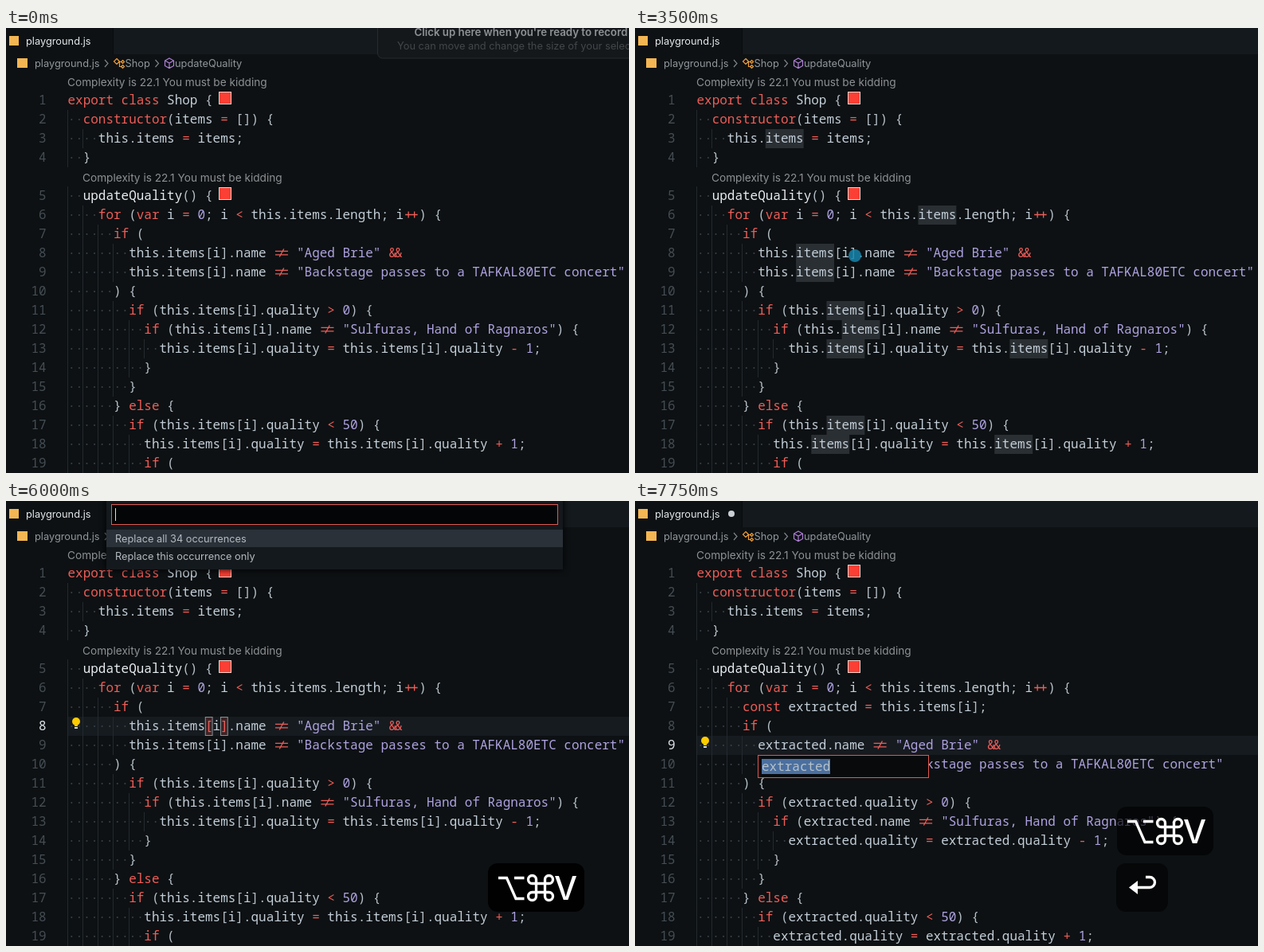
Recreate the animation shown at these times as an HTML page. Size 782x559 px, loop 8 s.

```html
<!DOCTYPE html>
<html lang="en">
<head>
<meta charset="utf-8">
<title>Extract variable</title>
<style>
  html, body { margin: 0; width: 100%; height: 100%; overflow: hidden; background: #0d1113; }
  svg { display: block; width: 782px; height: 559px; }
  text { font: 12.8px Inter, "Open Sans", sans-serif; fill: #a3a9ae; }
  .code text { font: 15.97px "Noto Sans Mono", "DejaVu Sans Mono", monospace; white-space: pre; }
  .code .key { fill: #ee5d58; }
  .code .str { fill: #aea2e0; }
  .code .id { fill: #c3ced8; }
  .code .fn { fill: #e8edf2; }
  .code .punct { fill: #b6c0c8; }
  .code .num { fill: #444d54; text-anchor: end; }
  .code .on { fill: #d3d9de; }
  .crumb { fill: #90979c; }
  .option { fill: #b4bbc1; }
  .lens { font-size: 13.65px; fill: #8d9194; }
  .lig { fill: none; stroke: #ee5d58; stroke-width: 1.3; }
  .glyph { fill: none; stroke: #fff; stroke-width: 3.3; }
</style>
</head>
<body>
<svg id="stage" viewBox="0 0 782 559">
  <rect width="782" height="559" fill="#0d1113"/>
  <rect x="134" width="648" height="33" fill="#14191d"/>
  <path d="M134.5 0V33" stroke="#090c0e"/>
  <rect x="4" y="10" width="12" height="12" fill="#f4b653"/>
  <text x="25" y="20.7" style="fill:#e4e8eb">playground.js</text>
  <circle id="dirty" cx="121" cy="16" r="4" fill="#c9cfd4"/>

  <rect x="14" y="38" width="13" height="12" fill="#f4b653"/>
  <text class="crumb" x="36" y="48.8">playground.js</text>
  <path d="M124 40l4 4.5l-4 4.5M187.5 40l4 4.5l-4 4.5" fill="none" stroke="#7d8489" stroke-width="1.2"/>
  <g fill="none" stroke="#ee9d3b" stroke-width="1.2">
    <path d="M139 38.5l3.5 3.5l-3.5 3.5l-3.5 -3.5zM141.5 42.5h4M142.5 42.5v6h3"/>
    <path d="M146.5 40.5l2 2l-2 2l-2 -2zM146.5 46.5l2 2l-2 2l-2 -2z"/>
  </g>
  <text class="crumb" x="149.5" y="48.8">Shop</text>
  <path d="M205 38l5.5 3v6.5l-5.5 3l-5.5 -3v-6.5zM199.5 41l5.5 3l5.5 -3M205 44v6.5" fill="none" stroke="#b180d7" stroke-width="1.2"/>
  <text class="crumb" x="212" y="48.8">updateQuality</text>

  <g id="under" class="code"></g>
  <text class="lens" x="77" y="73">Complexity is 22.1 You must be kidding</text>
  <text class="lens" x="96" y="193">Complexity is 22.1 You must be kidding</text>
  <g id="before" class="code"></g>
  <g id="after" class="code"></g>
  <g fill="#fb3f34" stroke="#f1d3cd">
    <rect x="267.5" y="80.5" width="15" height="15"/>
    <rect x="267.5" y="200.5" width="15" height="15"/>
  </g>
  <g id="over" class="code"></g>

  <g id="bulb">
    <circle cx="88" cy="277" r="5" fill="#ffcc00"/>
    <path d="M86 279h4v4h-4z" fill="#ffcc00"/>
    <path d="M86 284h4v2h-4z" fill="#d5d8da"/>
  </g>
  <rect id="caret" x="278" y="271" width="2" height="24" fill="#f2f4f5"/>
  <circle id="mouse" fill="#1685ad"/>

  <g id="rename" class="code">
    <rect x="154.5" y="319.5" width="214" height="28" fill="#080a0c" stroke="#e0574f"/>
    <rect x="159" y="324" width="86" height="19" fill="#4b709f"/>
    <text x="159" y="339" style="fill:#b5c1cc">extracted</text>
  </g>

  <g id="picker">
    <rect x="126" y="-10" width="573" height="96" fill="#14191d" style="filter:drop-shadow(0 0 4px #000)"/>
    <rect x="132.5" y="4.5" width="560" height="25" fill="#040506" stroke="#e0574f"/>
    <rect x="126" y="36" width="573" height="22" fill="#2a3138"/>
    <text class="option" x="137" y="51.8">Replace all 34 occurrences</text>
    <text class="option" x="137" y="73.8">Replace this occurrence only</text>
    <path id="inputCaret" d="M137.5 9V25" stroke="#d8dde1"/>
  </g>

  <g id="keys">
    <rect id="keysBack" x="605" y="455" width="121" height="61" rx="12"/>
    <path class="glyph" d="M618 473.5H628.5L640 499.5H650.5M638 473.5H650.5"/>
    <g id="command" class="glyph" transform="translate(671 486)"></g>
    <text x="688" y="501" style="font-size:41px;font-weight:500;fill:#fff">V</text>
  </g>
  <g id="enter">
    <rect x="604" y="455" width="65" height="61" rx="12" fill-opacity=".6"/>
    <path class="glyph" d="M627 485.5H646a6.5 6.5 0 0 0 0 -13H641"/>
    <path d="M631 477v17l-11 -8.5z" fill="#fff"/>
  </g>

  <g id="hint">
    <path d="M466.5 -1V32a6 6 0 0 0 6 6H783V-1z" fill="#14181b" stroke="#262b2e"/>
    <text x="512.5" y="9.8" style="font-size:13.25px;font-weight:600;fill:#8f9295">Click up here when you're ready to record</text>
    <text x="491" y="26.8" style="fill:#43474a">You can move and change the size of your selection</text>
  </g>
</svg>
<script>
const LOOP = 8000, X0 = 77.5, CW = 9.583;
const $ = id => document.getElementById(id);
const colX = col => X0 + col * CW;
const rowTop = n => 55 + n * 24 + (n > 4 ? 24 : 0);
const baseY = n => rowTop(n) + 17;

const source = `export class Shop {
  constructor(items = []) {
    this.items = items;
  }
  updateQuality() {
    for (var i = 0; i < this.items.length; i++) {
      if (
        this.items[i].name != "Aged Brie" &&
        this.items[i].name != "Backstage passes to a TAFKAL80ETC concert"
      ) {
        if (this.items[i].quality > 0) {
          if (this.items[i].name != "Sulfuras, Hand of Ragnaros") {
            this.items[i].quality = this.items[i].quality - 1;
          }
        }
      } else {
        if (this.items[i].quality < 50) {
          this.items[i].quality = this.items[i].quality + 1;
          if (`.split("\n");

const extracted = source.map(line => line.replaceAll("this.items[i]", "extracted"));
extracted.splice(6, 0, "      const extracted = this.items[i];");
extracted.length = source.length;

const escapeXml = s => s.replace(/&/g, "&amp;").replace(/</g, "&lt;");
const label = (x, y, cls, s) => `<text x="${x}" y="${y}" class="${cls}">${escapeXml(s)}</text>`;
const box = (x, y, w, h, attrs) => `<rect x="${x}" y="${y}" width="${w}" height="${h}" ${attrs}/>`;

const TOKEN = /"[^"]*"|!=|&&|\+\+|[A-Za-z_]\w*|\d+|[=<>+\-]|[^\s"\w=<>+\-]+/g;
const KEYWORD = /^(export|class|constructor|for|var|const|if|else|[=<>+\-])$/;

function tokenClass(s) {
  if (KEYWORD.test(s)) return "key";
  if (/^["\d]/.test(s)) return "str";
  if (s === "updateQuality") return "fn";
  return /^\w/.test(s) ? "id" : "punct";
}

// Operators drawn as joined ligatures
function drawToken(s, x, y) {
  if (s === "!=")
    return `<path class="lig" d="M${x + 1.7} ${y - 7.7}h16m-16 4.6h16M${x + 7} ${y - 0.5}l5.5 -10"/>`;
  if (s === "++")
    return `<path class="lig" d="M${x + 2} ${y - 5.5}h15.5M${x + 6} ${y - 9.5}v8m7.5 0v-8"/>`;
  if (s === "&&")
    return label(x + 0.5, y, "key", "&") + label(x + 8, y, "key", "&");
  return label(x, y, tokenClass(s), s);
}

function drawLine(line, i) {
  const n = i + 1, top = rowTop(n), y = baseY(n);
  const indent = line.search(/\S/);
  let dots = "", guides = "", out = label(50.6, y, "num", String(n));
  for (let c = 0; c < indent; c++) {
    dots += `M${colX(c + 0.5)} ${top + 12}h.01`;
    if (c % 2 === 0) guides += `M${Math.floor(colX(c)) + 0.5} ${top}v24`;
  }
  out += `<path d="${guides}" stroke="#22292e"/>`;
  out += `<path d="${dots}" stroke="#394249" stroke-width="2" stroke-linecap="round"/>`;
  for (const m of line.matchAll(TOKEN)) out += drawToken(m[0], colX(m.index), y);
  return out;
}

// Word highlights on every "this.items"
const matches = source.flatMap((line, i) => [...line.matchAll(/this\.items/g)]
  .map(m => box(colX(m.index + 5), rowTop(i + 1), 5 * CW, 24, 'fill="#2a2f33"'))).join("");

const activeRow = n => box(78, rowTop(n), 704, 24, 'fill="#161b20"');
const activeNumber = n => label(50.6, baseY(n), "num on", String(n));
const bracket = (col, s) =>
  box(colX(col) + 0.3, rowTop(8) + 0.5, CW - 0.8, 23, 'fill="#3b2527" stroke="#8b9195"')
  + label(colX(col), baseY(8), "key", s);

$("before").innerHTML = source.map(drawLine).join("");
$("after").innerHTML = extracted.map(drawLine).join("");
$("under").innerHTML = `<g id="matches">${matches}</g><g id="row8">${activeRow(8)}</g><g id="row9">${activeRow(9)}</g>`;
$("over").innerHTML = `<g id="mark8">${activeNumber(8)}${bracket(18, "[")}${bracket(20, "]")}</g>`
  + `<g id="mark9">${activeNumber(9)}</g>`;
$("command").innerHTML = [0, 90, 180, 270].map(a =>
  `<path d="M-5.5 0V-10.5A5 5 0 1 0 -10.5 -5.5H0" transform="rotate(${a})"/>`).join("");

// Pointer steps: start, x, y, radius, opacity
const pointer = [
  [3000, 310, 394, 8, 0.85],
  [3250, 276, 271, 8, 0.85],
  [3500, 276, 286, 8, 0.85],
  [3750, 272.5, 306, 8, 0.85],
  [4000, 272.5, 306, 10.5, 0.4],
  [4250, 272.5, 306, 10.5, 0.06],
  [4500, 280, 298, 8, 0.85],
  [4750, 280, 298, 8, 0]
];

const show = (id, on) => $(id).setAttribute("display", on ? "inline" : "none");

function update(t) {
  const within = (a, b) => t >= a && t < b;
  const blink = from => Math.floor((t - from) / 500) % 2 === 0;
  const edited = t >= 7500;

  show("hint", t < 250);
  show("matches", within(1500, 3750));
  show("before", !edited);
  show("after", edited);
  show("dirty", edited);
  for (const part of ["row", "mark"]) {
    show(part + 8, within(3750, 7500));
    show(part + 9, edited);
  }
  show("bulb", t >= 4250);
  $("bulb").setAttribute("transform", `translate(0 ${t >= 7750 ? 24 : 0})`);
  show("caret", within(3750, 6000) && blink(3750));
  show("picker", within(6000, 7500));
  show("inputCaret", blink(6000));
  show("rename", t >= 7750);

  show("keys", t >= 5750);
  show("enter", edited);
  $("keys").setAttribute("transform", `translate(0 ${edited ? -71 : 0})`);
  $("keysBack").setAttribute("fill-opacity", edited ? 0.65 : 0.95);

  const step = pointer.findLast(p => t >= p[0]);
  show("mouse", Boolean(step));
  if (step) ["cx", "cy", "r", "opacity"].forEach((k, i) => $("mouse").setAttribute(k, step[i + 1]));
}

const start = performance.now();
function frame() {
  update((performance.now() - start) % LOOP);
  requestAnimationFrame(frame);
}
frame();
</script>
</body>
</html>
```
